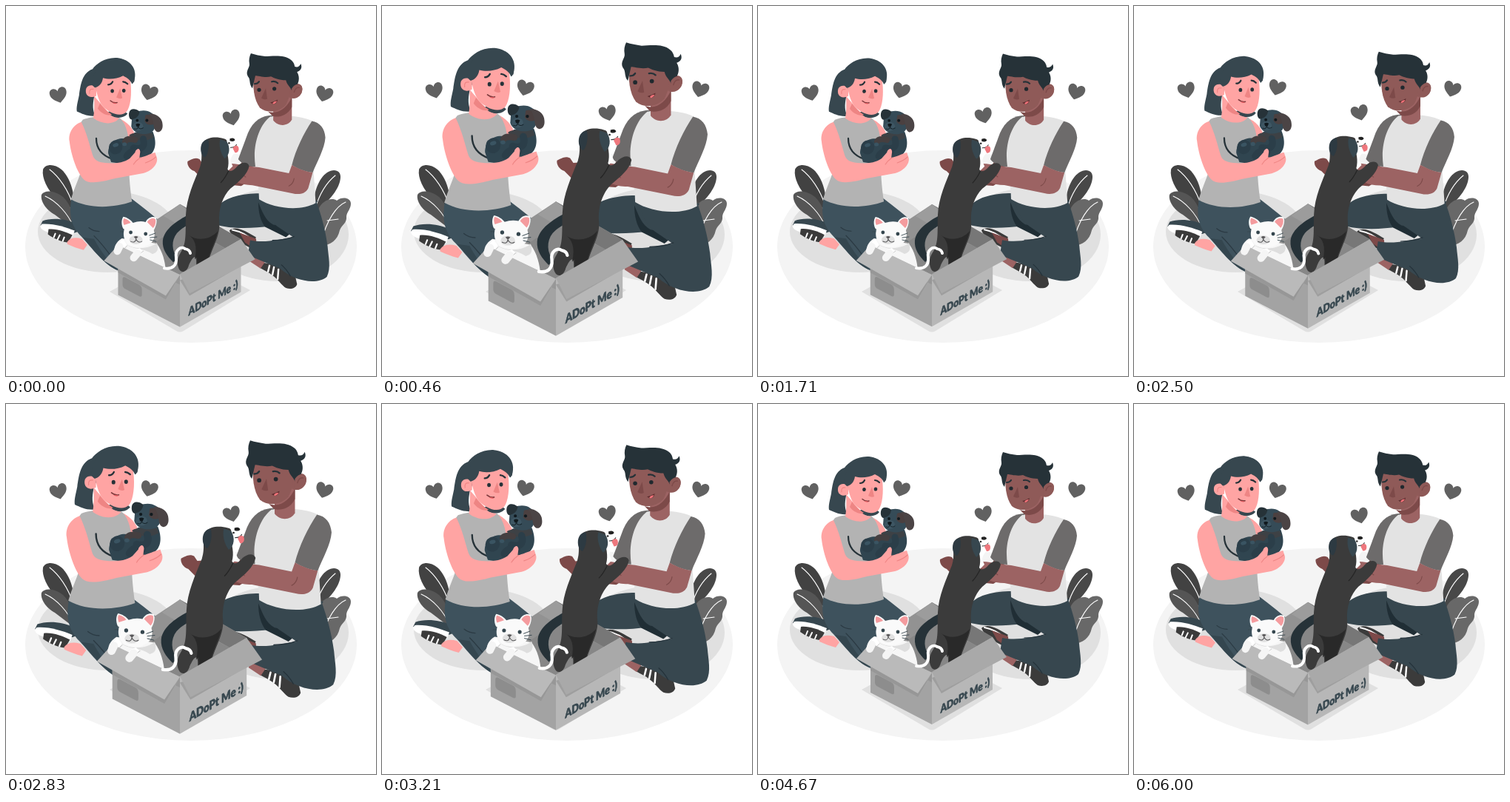
These frames come from a looping animation (500x500 px, 6.04 s). An HTML page with a canvas:

```html
<!DOCTYPE html>
<html lang="en">
<head>
<meta charset="utf-8">
<title>Adopt me</title>
<style>
html, body { margin: 0; width: 100%; height: 100%; overflow: hidden; background: #fff; }
canvas { display: block; width: 500px; height: 500px; }
</style>
</head>
<body>
<canvas id="stage" width="500" height="500"></canvas>
<script>
const ctx = document.getElementById('stage').getContext('2d');
const LOOP = 6040;
const SLATE = '#37474f', INK = '#263238', COAL = '#3b3b3b';
const PINK = '#ffa4a3', ROSE = '#ee8584', BROWN = '#9c6363', UMBER = '#7d4a49', TAN = '#8f5a58';
const CAT_TAIL = 'M214 354C225 356 231 350 230 340C228 329 237 324 242 328Q248 329 249 334';

function fill(color, d) {
  ctx.fillStyle = color;
  ctx.fill(new Path2D(d));
}

function line(color, width, d) {
  ctx.strokeStyle = color;
  ctx.lineWidth = width;
  ctx.lineCap = ctx.lineJoin = 'round';
  ctx.stroke(new Path2D(d));
}

function oval(color, x, y, rx, ry = rx, turn = 0) {
  ctx.fillStyle = color;
  ctx.beginPath();
  ctx.ellipse(x, y, rx, ry, turn, 0, Math.PI * 2);
  ctx.fill();
}

function scaled(x, y, s, draw) {
  ctx.save();
  ctx.translate(x, y);
  ctx.scale(s, s);
  ctx.translate(-x, -y);
  draw();
  ctx.restore();
}

// Slow gather up to the peak, then a soft release.
function beat(t, start, peak, end) {
  if (t <= start || t >= end) return 0;
  if (t < peak) return ((t - start) / (peak - start)) ** 3.3;
  return (1 + Math.cos(Math.PI * (t - peak) / (end - peak))) / 2;
}

function pulse(t) {
  const first = t > 5000 ? t - LOOP : t;
  return 1 + 0.1 * (beat(first, -330, 430, 1860) + beat(t, 2000, 2800, 3770));
}

function floor() {
  oval('#f4f4f4', 250, 325, 224, 130);
  oval('#e0e0e0', 137, 305, 94, 55);
  oval('#e0e0e0', 367, 309, 96, 63);
  fill('#e0e0e0', 'M140 386L235 334L330 384L240 439Q235 442 230 439Z');
}

function plants() {
  fill('#424242', 'M92 274C93 255 88 233 75 221C66 213 53 213 50 221C48 232 56 249 68 260C77 268 84 272 92 274Z');
  line('#fff', 1.1, 'M59 221C71 230 84 248 91 270');
  fill('#555', 'M93 298C92 283 87 267 77 258C66 249 52 248 48 255C46 264 55 276 66 282L91 301Z');
  line('#fff', 1.1, 'M53 257C69 264 84 281 91 298');
  fill('#484848', 'M416 272C415 254 422 233 434 225C443 219 453 222 452 232C451 247 437 263 421 276Z');
  line('#fff', 1.1, 'M445 229C434 238 424 253 418 273');
  fill('#686868', 'M422 275C427 263 440 258 447 263C454 257 466 259 466 267C466 274 461 278 460 284C461 294 454 295 451 303C448 317 439 322 426 325L418 300Z');
  line('#fff', 1.1, 'M459 265C447 270 434 288 426 318M434 290L449 288');
}

function heart(x, y, turn) {
  ctx.save();
  ctx.translate(x, y);
  ctx.rotate(turn);
  fill('#616161', 'M0 11C-6 7-12 3-11.5-4C-11-11-2-11 0-5C2-11 11-11 11.5-4C12 3 6 7 0 11Z');
  ctx.restore();
}

function puppy() {
  line(INK, 2.2, 'M122 179C122 192 129 202 144 207');
  fill('#304550', 'M138 199C138 184 151 177 163 180L174 171L198 170C203 183 203 196 192 203C177 212 157 214 142 211Z');
  fill('#3d4145', 'M166 175C172 170 184 172 197 172L199 178C188 184 175 183 166 175Z');
  line('#453f40', 8, 'M174 181C166 179 162 181 161 183');
  line('#2b3e49', 9, 'M185 180C188 190 183 195 172 192');
  oval('#2b3e49', 148, 191, 9, 9.5, .4);
  oval('#3a5462', 148, 188, 4, 2.5, -.3);
  line('#2b3e49', 9, 'M163 203C167 196 174 195 179 198');
  oval('#3a5462', 160, 187, 3, 2.5);
  fill('#354b57', 'M170 150C173 142 188 139 196 145C206 151 203 167 196 171C187 176 172 173 169 163Z');
  fill('#4b4040', 'M188 148C194 145 201 150 201 158C197 163 189 161 187 156Z');
  fill(INK, 'M180 143C174 138 167 139 166 145C165 151 168 156 172 153C177 152 180 147 180 143Z');
  fill('#4b4445', 'M193 146C201 145 211 151 211 160C212 168 207 172 203 170C197 166 201 155 193 146Z');
  oval('#3e5663', 178, 163, 7, 6);
  oval('#10191e', 177, 155, 1.9);
  oval('#10191e', 190, 155, 2);
  fill('#10191e', 'M175 160Q178 158 181 160L179 164L176 163Z');
  line('#17252c', 1, 'M178 164Q177 168 173 166M178 164Q181 168 185 165');
}

function girl() {
  fill(SLATE, 'M95 294C80 286 60 286 50 290L47 296L93 306L104 302Z');
  fill('#fff', 'M49 294C65 293 80 298 93 303L90 311L60 306C52 304 47 301 47 297Z');
  fill(COAL, 'M58 301C69 300 80 304 90 309L84 319C74 318 64 313 57 308Z');
  line('#fff', 2, 'M67 307L65 312M73 309L70 315M79 312L77 317');
  fill(PINK, 'M83 318Q89 310 103 314L110 322L105 329C97 327 90 324 83 321Z');
  fill('#3e525d', 'M89 258C85 280 87 296 102 311C116 326 132 349 152 357L218 340L216 298C200 284 184 271 168 259Z');
  fill('#34464f', 'M151 356C140 346 128 331 119 314L104 312C118 328 135 351 151 356Z');
  line('#2b3a43', 1.2, 'M119 310Q131 322 143 339M126 304Q118 304 112 299');
  fill(PINK, 'M148 151C160 154 169 162 174 174L177 208L159 202Z');
  fill('#b3b3b3', 'M104 154C118 148 145 149 154 152C163 161 166 176 166 193C165 222 167 244 170 264C145 273 111 274 88 261C92 247 98 235 102 222L112 195C107 185 101 171 101 158Z');
  fill(SLATE, 'M173 102C178 85 167 73 150 71C134 70 122 79 117 86C103 91 101 107 99 121C97 131 95 137 96 143C103 146 110 150 121 149C117 142 117 134 119 124L130 95Z');
  fill(SLATE, 'M136 144C143 153 158 154 164 146L155 139Z');
  fill(PINK, 'M119 122Q120 140 118 152C130 161 146 161 153 152Q142 151 139 145Z');
  fill(ROSE, 'M127 132C132 139 137 143 143 147C137 150 128 145 124 139Z');
  fill(PINK, 'M121 110C119 96 132 89 145 91C157 90 168 95 168 103C170 120 168 136 163 143C155 152 139 145 131 136C126 131 123 121 121 110Z');
  fill(PINK, 'M122 113C121 107 111 106 108.500 112C106 120 112 127 122 122Z');
  line(ROSE, 1.1, 'M118 113Q112 112 113 119');
  fill(SLATE, 'M117 108C115 90 129 75 147 72C166 71 176 85 173 103C171 105 171 106 170 106C168 101 164 98 158 95C149 100 138 100 131 98C130 105 126 110 120 111Z');
  line(INK, 2.2, 'M138 107Q142 107 144 103M158 103Q161 103 164 106');
  oval(INK, 143.500, 115.5, 2.3, 2.6);
  oval(INK, 159, 115, 2.3, 2.6);
  fill(ROSE, 'M154 112L157 125Q154 127 149 124Z');
  line('#7b393c', 1.5, 'M141 128.500Q145 132 150 131');
  fill('#e45c61', 'M143 131Q147 131 150 132Q147 134 143 131Z');
  puppy();
  fill(PINK, 'M102 157C92 160 84 171 86 183C88 201 96 225 105 234C112 241 128 238 147 233L185 226C199 222 206 211 203 204L201 198C194 200 186 204 180 205L181 197C180 190 175 194 174 198L167 206C157 213 144 213 134 212C124 211 119 208 117 201C113 188 110 174 102 157Z');
  line(ROSE, 1.1, 'M181 205Q175 209 172 214M202 204Q197 209 188 212');
}

function manLegs() {
  fill(COAL, 'M302 303C311 295 326 305 338 312L330 326C317 320 307 314 302 303Z');
  line('#fff', 2, 'M306 302C316 304 326 309 333 316');
  fill(UMBER, 'M316 306L338 314L339 330L323 319Z');
  fill(COAL, 'M344 346C354 346 364 350 375 354L391 366L393 375C391 381 384 382 378 380C373 377 367 368 360 363C355 359 348 356 343 353Z');
  line('#fff', 2.4, 'M362 352L360 362M368 355L367 368M356 350L354 358');
  fill(BROWN, 'M330 336L350 345L344 354L329 344Z');
  fill(SLATE, 'M343 253C319 253 298 258 288 269L277 291C291 301 328 301 357 297L390 309L421 263Z');
  fill('#202e35', 'M341 265C341 279 344 290 350 298L378 312L392 300L361 295C350 289 346 277 341 265Z');
  fill(SLATE, 'M345 253C349 275 354 288 366 297L388 312C368 315 350 320 330 316L327 336L370 354C391 372 420 376 433 365C439 353 435 338 434 324C431 301 425 281 419 264Z');
  line('#25333b', 1.2, 'M360 316Q376 316 389 311M372 349Q379 355 384 364');
}

function man() {
  manLegs();
  fill(UMBER, 'M324 202L316 216C297 211 277 212 266 213L262 207C255 204 251 208 246 210C245 215 249 221 255 223L264 232C280 242 299 241 318 243L340 229Z');
  fill('#6d6b6b', 'M361 148C345 148 334 156 327 172L314 207C319 214 328 217 337 217L351 181Z');
  fill('#e3e3e3', 'M357 150C373 148 397 148 414 156C416 168 411 179 413 191L418 266C397 278 361 273 342 261C342 239 336 220 336 203C336 181 344 160 357 150Z');
  fill('#6d6b6b', 'M413 156C424 158 430 166 431 178C430 193 420 210 414 225C404 224 394 220 386 215C391 195 402 172 413 156Z');
  fill(BROWN, 'M386 215C395 220 405 224 414 225L408 246C404 254 395 255 387 253L333 242C317 242 305 236 302 229L310 224C301 222 292 220 289 216C299 211 313 213 323 216L342 218L382 226Z');
  line(UMBER, 1.1, 'M310 224Q318 226 324 231M389 233Q388 240 382 243');
  fill(BROWN, 'M361 130L361 155C368 164 381 163 386 154L386 116Z');
  fill(UMBER, 'M354 143C369 148 380 137 386 124L386 137C379 151 365 151 360 149Z');
  fill(TAN, 'M335 91C333 110 335 127 343 138C354 147 370 143 378 134C384 122 387 108 384 93C370 83 345 81 335 91Z');
  fill(TAN, 'M384 112C391 102 400 105 400 113C400 122 391 129 382 124Z');
  line(UMBER, 1.3, 'M389 117Q391 110 396 111');
  fill(INK, 'M331 65C337 67 343 68 350 69C359 69 376 66 385 74Q389 77 390 83C394 84 396 83 398 79C401 86 396 89 393 90C398 98 394 106 393 107C394 112 390 117 387 118C385 110 380 109 378 101C369 101 362 98 358 96C350 98 341 95 337 95L333 112C328 106 331 100 327 96C323 89 330 84 329 79C328 74 329 69 331 65Z');
  fill(TAN, 'M386 112C391 104 400 105 400 113C400 122 391 127 385 123Z');
  line(UMBER, 1.3, 'M389 117Q391 110 396 111');
  line(INK, 2.2, 'M336 106Q340 106 342 103M359 103Q364 102 367 105');
  oval('#20292e', 342, 114, 2.6);
  oval('#20292e', 362.500, 112.500, 2.6);
  fill(UMBER, 'M351 112L353 126Q349 128 345 125Z');
  fill('#5b2b2d', 'M357 131Q362 130 367 127Q366 133 361 133Z');
  fill('#f2737a', 'M360 132Q362 129 366 129Q364 133 361 133Z');
}

function boxInside() {
  fill('#929292', 'M152 323L235 268L317 315L235 363Z');
  fill('#777', 'M235 268L317 315L296 327L235 293Z');
  fill('#9c9c9c', 'M235 268L213 284L235 297L252 280Z');
  fill('#878787', 'M235 297L296 327L235 363L178 335Z');
}

function dog() {
  fill(INK, 'M247 282C232 290 214 301 212 317C211 329 218 338 226 346L232 341C224 331 223 317 231 307C237 300 245 297 249 293Z');
  fill('#fff', 'M294 182C301 177 310 181 311 187L313 191C311 198 303 203 303 210L306 217L295 228L286 201Z');
  fill(COAL, 'M267 184C261 193 267 203 262 218C254 238 244 259 243 282C242 302 245 320 236 333C230 342 231 351 235 357C239 361 245 358 247 350C251 341 256 334 257 344L257 354C260 360 271 356 273 348C276 329 289 313 288 294C286 274 293 257 303 247C314 238 326 228 328 217C326 210 317 212 312 217C307 223 302 226 299 221C302 211 299 200 296 190C299 184 299 181 294 180C284 177 272 178 267 184Z');
  fill('#292929', 'M246 309C255 314 259 325 255 342L258 339L258 354C265 358 272 354 272 347C275 331 283 318 286 304C277 315 259 319 246 309Z');
  fill('#2d3a42', 'M273 181C266 182 263 187 263 194C263 200 266 205 269 205C273 200 275 190 273 181Z');
  fill(SLATE, 'M289 181C287 188 289 199 295 207C302 202 303 192 298 184Z');
  fill('#222', 'M302 180Q308 178 309 182Q307 185 302 183Z');
  oval('#222', 301, 186, 1.2);
  line('#333', 1, 'M303 192Q309 192 311 188');
  fill('#ee777d', 'M308 190Q314 188 314 194Q314 199 309 199L306 193Z');
  line('#252525', 1.2, 'M300 224Q295 234 290 239');
}

function cat() {
  fill('#f6f6f6', 'M157 314C149 319 146 326 147 333L153 337L216 357C215 345 212 332 204 321Z');
  fill('#dedede', 'M159 319C174 332 196 327 204 320C207 329 205 333 198 335C185 326 169 330 159 319Z');
  fill('#fff', 'M159 315C154 317 147 328 147 333Q151 339 156 334L164 323Z');
  fill('#fff', 'M181 327C172 329 168 337 168 343Q173 347 178 342L186 332Z');
  line('#cfcfcf', 1, 'M156 334Q159 328 164 324M178 342Q180 335 186 331');
  fill('#fafafa', 'M160 303C156 297 156 289 159 285C164 286 169 289 172 293Q181 290 189 292C192 286 198 284 203 286C205 291 203 298 200 303C204 316 195 326 180 326C166 327 157 316 160 303Z');
  fill('#f49b9e', 'M191 292C194 287 199 286 202 288C203 292 202 297 199 300Z');
  fill('#f49b9e', 'M160 296C158 291 159 288 160 287C164 288 167 290 169 293Z');
  oval('#e1e1e1', 176, 316, 9, 6);
  oval('#35464e', 169, 306, 2.4);
  oval('#35464e', 189, 308, 2.4);
  fill('#59585a', 'M173 312Q176 310 179 312L176 315Z');
  line('#58585a', 1, 'M176 315Q175 321 169 318M176 315Q179 321 184 318');
  line('#37474f', .9, 'M194 310L202 307M195 313L204 312M195 316L203 318M160 302L156 300M159 305L155 305');
}

function boxFront() {
  fill('#a3a3a3', 'M152 324L235 363V433L152 390Z');
  fill('#b7b7b7', 'M235 363L317 315V386L235 433Z');
  fill('#8d8d8d', 'M158 369Q158 364 163 367L180 376Q184 378 184 383V390Q184 394 179 391L162 382Q158 380 158 376Z');
  fill('#979797', 'M152 337L235 376L235 363L216 396L152 360Z');
  fill('#bababa', 'M152 323L235 363L216 391L133 344Z');
  fill('#9e9e9e', 'M235 370L248 391L317 351V343Z');
  fill('#a9a9a9', 'M235 362L317 315L336 342L248 388Z');
  ctx.save();
  ctx.transform(.8, -.455, 0, 1, 246.5, 418);
  ctx.font = '900 15px Lato, "Open Sans", sans-serif';
  ctx.fillStyle = ctx.strokeStyle = SLATE;
  ctx.lineWidth = .5;
  ctx.lineJoin = 'round';
  ctx.fillText('ADoPt Me :)', 0, 0);
  ctx.strokeText('ADoPt Me :)', 0, 0);
  ctx.restore();
}

function boxGroup() {
  boxInside();
  dog();
  cat();
  boxFront();
  // Paws and tail rest over the front edge.
  line('#f5f5f5', 10, 'M154 325L151 331M178 334L173 340');
  line('#fff', 3.9, CAT_TAIL);
}

function frame(now) {
  const t = now % LOOP;
  const s = pulse(t);
  const lift = 10 * (1 - Math.abs(1 - (t % 1500) / 750));
  ctx.clearRect(0, 0, 500, 500);
  floor();
  plants();
  scaled(341, 222, s, man);
  scaled(126, 214, s, girl);
  scaled(235, 306, s, boxGroup);
  heart(71, 120 - lift, -.25);
  heart(193.500, 116.5 - lift, .28);
  heart(305, 150.500 - lift, -.25);
  heart(430, 118.500 - lift, .28);
  requestAnimationFrame(frame);
}
requestAnimationFrame(frame);
</script>
</body>
</html>
```
